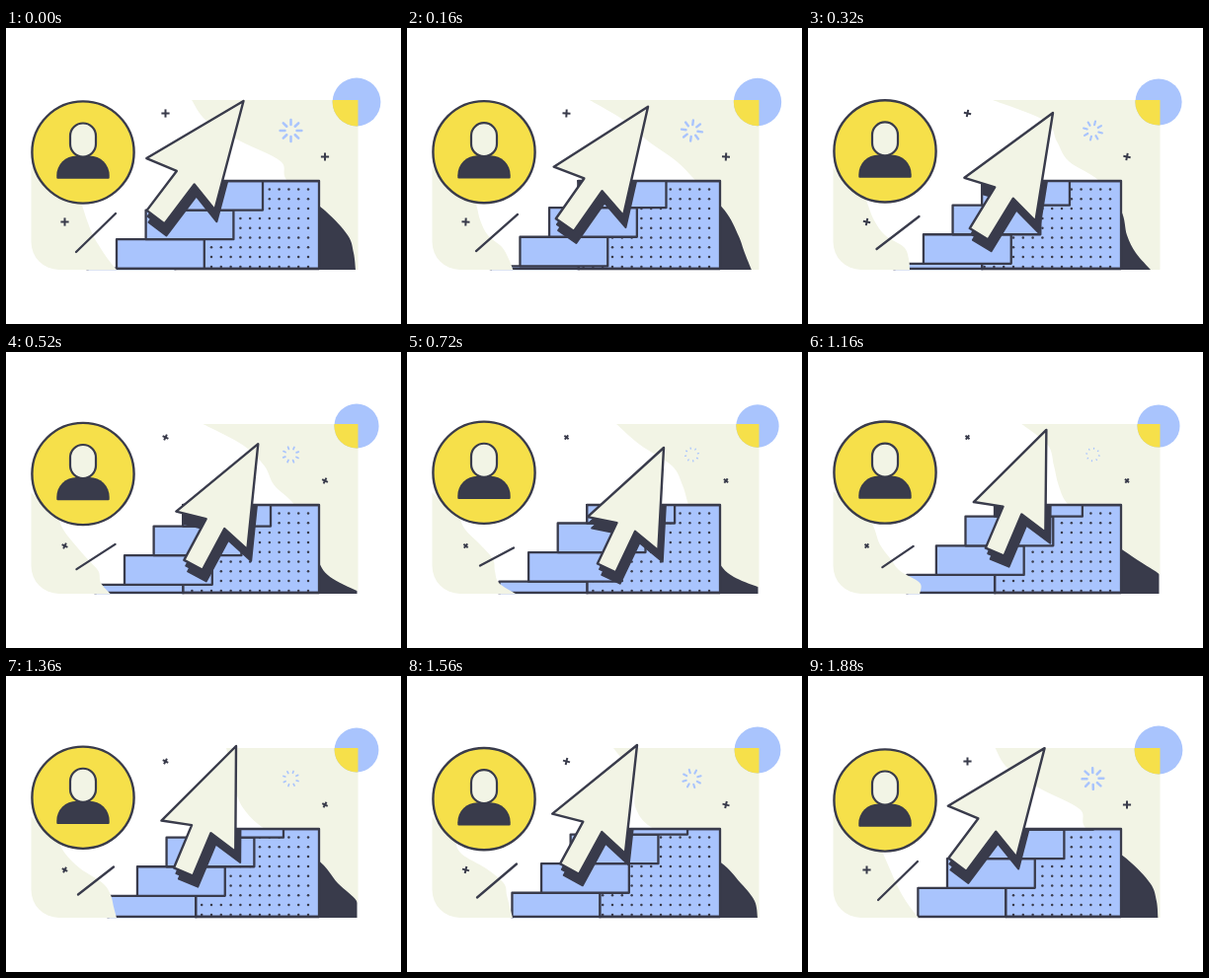
These frames come from a looping animation (400x300 px, 1.92 s). An HTML page with a canvas:

```html
<!DOCTYPE html>
<html lang="en">
<head>
<meta charset="utf-8">
<title>Climbing steps</title>
<style>
html, body { margin: 0; width: 100%; height: 100%; overflow: hidden; background: #fff; }
canvas { display: block; width: 400px; height: 300px; }
</style>
</head>
<body>
<canvas id="stage" width="400" height="300"></canvas>
<script>
const ctx = document.getElementById('stage').getContext('2d');
const LOOP = 1920, TICK = 40;
const INK = '#393b4b', CREAM = '#f2f4e5', BLUE = '#a9c4fd', YELLOW = '#f6e04a';
const RISE = 29.6, TOP = 155, FLOOR = 244, WALL = 317;

// Each track row holds one value per time in KEYS.
const KEYS = [0, 320, 720, 1000, 1360, 1560];
const TIP_X = [240.5, 248, 260, 249, 233, 233];
const TIP_Y = [74, 86, 97, 86, 71, 70];
const TURN = [0, -5.7, -11.7, -13.2, -14.4, -8.5];
const DASH_X = [20, 21.5, 17, 14.5, 18, 20];
const DASH_Y = [19.5, 16.5, 9, 8.5, 14, 17];

// Wave edges: height, then x at each key time.
const RIGHT_EDGE = [
  [73, 188, 187, 212, 210, 223, 209],
  [94, 203, 240, 236, 251, 228, 224],
  [115, 238, 252, 268, 262, 232, 230],
  [135, 278, 264, 279, 264, 241, 232],
  [155, 285, 295, 285, 266, 262, 250],
  [185, 323, 317, 295, 285, 314, 312],
  [210, 346, 323, 313, 328, 336, 338],
  [228, 352, 332, 331, 357, 355, 352],
  [245, 354, 347, 375, 360, 357, 355]
];
const LEFT_EDGE = [
  [165, 70, 56, 52, 66, 52, 48],
  [180, 77, 61, 59, 71, 60, 55],
  [195, 82, 67, 74, 72, 75, 80],
  [210, 88, 78, 87, 75, 98, 98],
  [222, 95, 97, 89, 84, 106, 101],
  [234, 103, 102, 93, 113, 109, 104],
  [245, 112, 103, 110, 113, 112, 107]
];

// Periodic cubic interpolation along a track.
function sample(track, t) {
  const n = KEYS.length;
  const time = i => KEYS[(i + n) % n] + LOOP * Math.floor(i / n);
  const val = i => track[(i + n) % n];
  const slope = i => (val(i + 1) - val(i - 1)) / (time(i + 1) - time(i - 1));
  let i = n - 1;
  while (KEYS[i] > t) i--;
  const h = time(i + 1) - time(i), u = (t - time(i)) / h, v = 1 - u;
  return v * v * (1 + 2 * u) * val(i) + u * u * (3 - 2 * u) * val(i + 1)
    + h * u * v * (v * slope(i) - u * slope(i + 1));
}

function scoped(fn) {
  ctx.save();
  fn();
  ctx.restore();
}

function paint(fill, stroke, width) {
  if (fill) { ctx.fillStyle = fill; ctx.fill(); }
  if (stroke) { ctx.strokeStyle = stroke; ctx.lineWidth = width; ctx.stroke(); }
}

function line(x1, y1, x2, y2, color, width) {
  ctx.beginPath();
  ctx.moveTo(x1, y1);
  ctx.lineTo(x2, y2);
  paint(null, color, width);
}

function circle(x, y, r) {
  ctx.beginPath();
  ctx.arc(x, y, r, 0, Math.PI * 2);
}

function clipRect(x, y, w, h) {
  ctx.beginPath();
  ctx.rect(x, y, w, h);
  ctx.clip();
}

function clipPanel() {
  ctx.beginPath();
  ctx.roundRect(25.5, 73, 331, 172, [0, 0, 0, 28]);
  ctx.clip();
}

// Cream area between a wavy edge and a straight side.
function wave(edge, side, sideTop, t) {
  const pts = edge.map(([y, ...xs]) => [sample(xs, t), y]);
  const at = i => pts[Math.max(0, Math.min(pts.length - 1, i))];
  ctx.beginPath();
  ctx.moveTo(side, sideTop);
  ctx.lineTo(...pts[0]);
  for (let i = 0; i < pts.length - 1; i++) {
    const [a, b, c, d] = [at(i - 1), at(i), at(i + 1), at(i + 2)];
    ctx.bezierCurveTo(
      b[0] + (c[0] - a[0]) / 6, b[1] + (c[1] - a[1]) / 6,
      c[0] - (d[0] - b[0]) / 6, c[1] - (d[1] - b[1]) / 6,
      c[0], c[1]);
  }
  ctx.lineTo(side, 246);
  ctx.closePath();
  paint(CREAM);
}

const stepX = (k, p) => 112 + RISE * (k + p);
const stepY = (k, p) => 214.2 - RISE * (k + p);

function stairs(p) {
  const left = stepX(2, p);
  ctx.beginPath();
  ctx.rect(left, TOP, WALL - left, FLOOR - TOP);
  paint(BLUE);
  for (let x = 306; x > left; x -= 9.8) {
    for (let y = 163.5; y < FLOOR - 2; y += 9.8) {
      circle(x, y, 1.25);
      paint(INK);
    }
  }
  ctx.beginPath();
  ctx.rect(left, TOP, WALL - left, FLOOR - TOP);
  paint(null, INK, 2.3);
  scoped(() => {
    clipRect(0, TOP - 1.1, 400, FLOOR - TOP + 2.3);
    for (let k = -1; k <= 2; k++) {
      ctx.beginPath();
      ctx.rect(stepX(k, p), stepY(k, p), RISE * 3, RISE);
      paint(BLUE, INK, 2.3);
    }
    line(left - 1, TOP, WALL, TOP, INK, 2.3);
    line(stepX(-1, p), FLOOR, WALL, FLOOR, INK, 2.3);
  });
}

function clipStairs(p) {
  ctx.beginPath();
  for (let k = -1; k <= 2; k++) {
    const y = Math.max(TOP - 1, stepY(k, p));
    ctx.rect(stepX(k, p) - 1, y, WALL - stepX(k, p) + 1, FLOOR + 1 - y);
  }
  ctx.clip();
}

// Arrow points as distance along and across its axis.
const HALF = [[105.5, 43.3], [97.4, 11.2], [147.5, 11.2]];
const ARROW = [[0, 0], ...HALF, ...HALF.map(([a, b]) => [a, -b]).reverse()];

function arrow(t, beat, p) {
  const turn = sample(TURN, t) * Math.PI / 180;
  const axis = 37.1 * Math.PI / 180 + turn;
  const size = 0.95 + 0.05 * beat;
  const sin = Math.sin(axis), cos = Math.cos(axis);
  const x = sample(TIP_X, t), y = sample(TIP_Y, t);
  const trace = (dx, dy) => {
    ctx.beginPath();
    for (const [a, b] of ARROW) {
      ctx.lineTo(x + dx + size * (-sin * a - cos * b), y + dy + size * (cos * a - sin * b));
    }
    ctx.closePath();
  };
  const shiftX = 2 * Math.cos(turn) - 12 * Math.sin(turn);
  const shiftY = 2 * Math.sin(turn) + 12 * Math.cos(turn);
  scoped(() => {
    clipStairs(p);
    for (const f of [0.5, 1]) {
      trace(shiftX * f, shiftY * f);
      paint(INK, INK, 2);
    }
  });
  trace(0, 0);
  paint(CREAM, INK, 2.4);
}

function avatar(beat) {
  scoped(() => {
    ctx.translate(78, 123.8 + 2.2 * beat);
    circle(0, 0, 51.6);
    paint(YELLOW, INK, 2.4);
    ctx.beginPath();
    ctx.roundRect(-26.7, 3.5, 53.4, 23.3, [20, 20, 1, 1]);
    paint(INK);
    ctx.beginPath();
    ctx.roundRect(-13, -29.5, 26, 34, 13);
    paint(CREAM, INK, 2.2);
  });
}

function plus(x, y, beat) {
  const r = 3.3 + 0.8 * beat;
  scoped(() => {
    ctx.translate(x, y);
    ctx.rotate(Math.PI / 8 * (1 - beat));
    line(-r, 0, r, 0, INK, 2);
    line(0, -r, 0, r, INK, 2);
  });
}

function spinner(beat, p) {
  scoped(() => {
    ctx.translate(288.5, 104);
    ctx.rotate(p * Math.PI / 2);
    ctx.lineCap = 'round';
    for (let i = 0; i < 8; i++) {
      line(0, -6, 0, -8.6 - 2.3 * beat, BLUE, 1.8 + 0.7 * beat);
      ctx.rotate(Math.PI / 4);
    }
  });
}

function badge(beat) {
  const r = 22.8 + 1.6 * beat;
  circle(355, 75, r);
  paint(BLUE);
  scoped(() => {
    clipPanel();
    circle(355, 75, r);
    paint(YELLOW);
  });
}

function draw(t) {
  const p = t / LOOP;
  const beat = Math.cos(p * Math.PI * 2);
  ctx.fillStyle = '#fff';
  ctx.fillRect(0, 0, 400, 300);
  ctx.lineJoin = 'round';

  scoped(() => {
    clipPanel();
    ctx.fillStyle = INK;
    ctx.fillRect(WALL, TOP, 38.5, 90);
    wave(RIGHT_EDGE, 380, 73, t);
  });
  stairs(p);
  scoped(() => {
    clipPanel();
    wave(LEFT_EDGE, 20, 138, t);
  });
  arrow(t, beat, p);
  avatar(beat);
  badge(beat);
  spinner(beat, p);
  plus(161.5, 86.5, beat);
  plus(323, 130.5, beat);
  plus(59.5, 196.5, beat);

  const dx = sample(DASH_X, t), dy = sample(DASH_Y, t);
  scoped(() => {
    ctx.lineCap = 'round';
    line(91 - dx, 207.5 + dy, 91 + dx, 207.5 - dy, INK, 2.3);
  });
}

const start = performance.now();
function loop() {
  const t = (performance.now() - start) % LOOP;
  draw(Math.floor(t / TICK) * TICK);
  requestAnimationFrame(loop);
}
loop();
</script>
</body>
</html>
```
